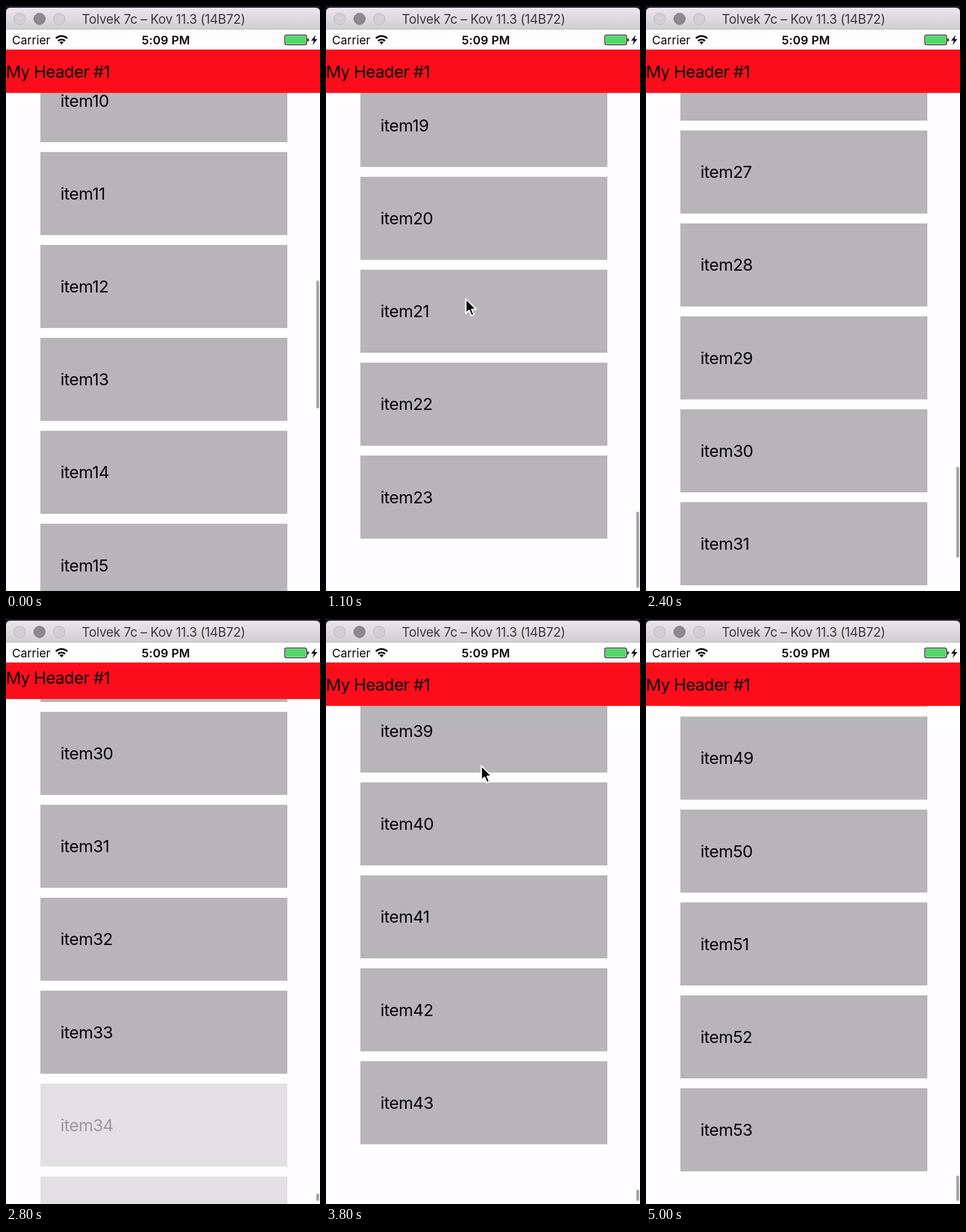
An HTML page that plays this animation: 548 px wide and 1021 px high, repeating every 5.1 s.

```html
<!DOCTYPE html>
<html lang="en">
<head>
<meta charset="utf-8">
<title>Sticky header list</title>
<style>
  html, body { margin: 0; width: 100%; height: 100%; overflow: hidden; background: #fffdff; }
  svg { display: block; width: 548px; height: 1021px; }
  text { font-family: Inter, "Open Sans", sans-serif; fill: #080608; }
  .label { font-size: 29.1px; letter-spacing: -.018em; }
  .heading { font-size: 29.1px; letter-spacing: -.026em; }
  .status { font-size: 20.5px; }
  .title { font-size: 22.3px; letter-spacing: -.013em; fill: #3c3a3d; text-anchor: middle; }
  .light { fill: #d1cfd2; stroke: #b8b6b9; }
  .light.active { fill: #8c8a8d; stroke: #777578; }
</style>
</head>
<body>
<svg viewBox="0 0 548 1021">
  <defs>
    <linearGradient id="chrome" x2="0" y2="1">
      <stop offset="0" stop-color="#ebe5eb"/>
      <stop offset="1" stop-color="#d0ced1"/>
    </linearGradient>
  </defs>
  <rect width="548" height="1021" fill="#fffdff"/>
  <g id="list"></g>
  <g id="header">
    <rect y="76" width="548" height="75.7" fill="#fc0d1b"/>
    <text class="heading" x="0" y="124.5">My Header #1</text>
  </g>
  <rect id="bar" x="541.5" width="5" rx="2.5" fill="#a5a3a6"/>

  <g id="statusBar">
    <rect y="41" width="548" height="35" fill="#fffdff"/>
    <text class="status" x="10.5" y="66.5">Carrier</text>
    <path d="M87 56.5a14.5 14.5 0 0 1 20 0M91 60.8a8.7 8.7 0 0 1 12 0"
          fill="none" stroke="#080608" stroke-width="3"/>
    <path d="M97 67l-3.6-3.8a5 5 0 0 1 7.2 0z" fill="#080608"/>
    <text class="status" x="279" y="66.5" text-anchor="middle" font-weight="600" letter-spacing=".2">5:09 PM</text>
    <rect x="486.6" y="50.6" width="38" height="17" rx="3" fill="#fffdff" stroke="#080608" stroke-width="1.3"/>
    <rect x="488" y="52" width="35.2" height="14.2" rx="1.5" fill="#53d769"/>
    <path d="M526 56.2q2.4 .6 2.4 3t-2.4 3z" fill="#080608"/>
    <path d="M540.5 50.5l-8 10h4.8l-2.3 7.5 8.5-10.3h-5z" fill="#080608"/>
  </g>

  <g id="windowBar">
    <rect width="548" height="16" fill="#201d2b"/>
    <path d="M0 41V11q0-8 8-8H540q8 0 8 8V41z" fill="url(#chrome)"/>
    <rect y="40" width="548" height="1" fill="#b3b1b4"/>
    <circle class="light" cx="24" cy="22.5" r="10"/>
    <circle class="light active" cx="58.5" cy="22.5" r="10"/>
    <circle class="light" cx="93" cy="22.5" r="10"/>
    <text class="title" x="275" y="31">Tolvek 7c – Kov 11.3 (14B72)</text>
  </g>

  <path id="cursor" d="M0 0V25.5L5.8 20.2L9.8 29.5L14.3 27.5L10.4 18.5H18.3Z" fill="#080608"
        stroke="#fffdff" stroke-width="2.4" stroke-linejoin="round"/>
</svg>
<script>
const LOOP = 5100, STEP = 100;
const PITCH = 162.17, VIEW = 945, TRACK_TOP = 80.5, TRACK = 935;
const FIRST_LOAD = 24, LOAD = 10, FADE = 250, SETTLE = 200;
const LOADS = [1500, 2700, 4000]; // when each further batch starts to appear

// Ends of the swipes and pauses: time, scroll distance
const SWIPES = [
  [0, 1529], [1100, 2945.3], [1400, 3000], [2000, 3450.6], [2800, 4703], [3100, 4730],
  [3800, 6201.6], [4200, 6215], [4500, 6584], [4850, 7790], [5000, 7776]
];
// The pointer shows briefly around the end of a drag
const POINTER = [{ t: 1100, x: 244, y: 511 }, { t: 2000, x: 280, y: 242 }, { t: 3800, x: 271, y: 256 }];

const $ = id => document.getElementById(id);
const clamp = (v, lo, hi) => Math.min(hi, Math.max(lo, v));
const shift = (node, x, y) => node.setAttribute("transform", `translate(${x} ${y})`);

const total = FIRST_LOAD + LOAD * LOADS.length;
const items = Array.from({ length: total }, (_, n) => {
  const g = document.createElementNS("http://www.w3.org/2000/svg", "g");
  shift(g, 60, n * PITCH);
  g.innerHTML = `<rect width="431" height="145" fill="#b7b5b8"/>
    <text class="label" x="35" y="83">item${n}</text>`;
  $("list").append(g);
  return g;
});

const rate = i => (SWIPES[i + 1][1] - SWIPES[i][1]) / (SWIPES[i + 1][0] - SWIPES[i][0]);

// Harmonic mean of the neighbouring rates, so the curve never overshoots
function slope(i) {
  if (i === 0) return rate(0);
  if (i === SWIPES.length - 1) return rate(i - 1);
  const a = rate(i - 1), b = rate(i);
  return a * b > 0 ? 2 * a * b / (a + b) : 0;
}

function scrollAt(t) {
  const next = SWIPES.findIndex(p => p[0] > t);
  const i = next < 0 ? SWIPES.length - 2 : next - 1;
  const [t0, s0] = SWIPES[i], [t1, s1] = SWIPES[i + 1];
  const d = t1 - t0, u = (t - t0) / d, v = 1 - u;
  return s0 * (1 + 2 * u) * v * v + s1 * u * u * (3 - 2 * u)
       + d * u * v * (slope(i) * v - slope(i + 1) * u);
}

function draw(t) {
  const s = scrollAt(t);
  shift($("list"), 0, -s);

  items.slice(FIRST_LOAD).forEach((item, k) => {
    const start = LOADS[Math.floor(k / LOAD)];
    item.setAttribute("opacity", clamp((t - start) / FADE, 0, 1));
  });

  const count = FIRST_LOAD + LOAD * LOADS.filter(start => t >= start + SETTLE).length;
  const content = count * PITCH + 68, y = s + 160;
  const over = Math.max(0, y - (content - VIEW));
  const size = Math.max(13, VIEW / content * TRACK - over);
  const top = over ? TRACK_TOP + TRACK - size : TRACK_TOP + y / content * TRACK;
  $("bar").setAttribute("y", top);
  $("bar").setAttribute("height", size);
  shift($("header"), 0, -clamp(over - 214, 0, 12));

  const p = POINTER.find(p => Math.abs(t - p.t) <= 150);
  $("cursor").setAttribute("visibility", p ? "visible" : "hidden");
  if (p) shift($("cursor"), p.x, p.y);
}

function tick() {
  draw(Math.floor(performance.now() % LOOP / STEP) * STEP);
  requestAnimationFrame(tick);
}
tick();
</script>
</body>
</html>
```
